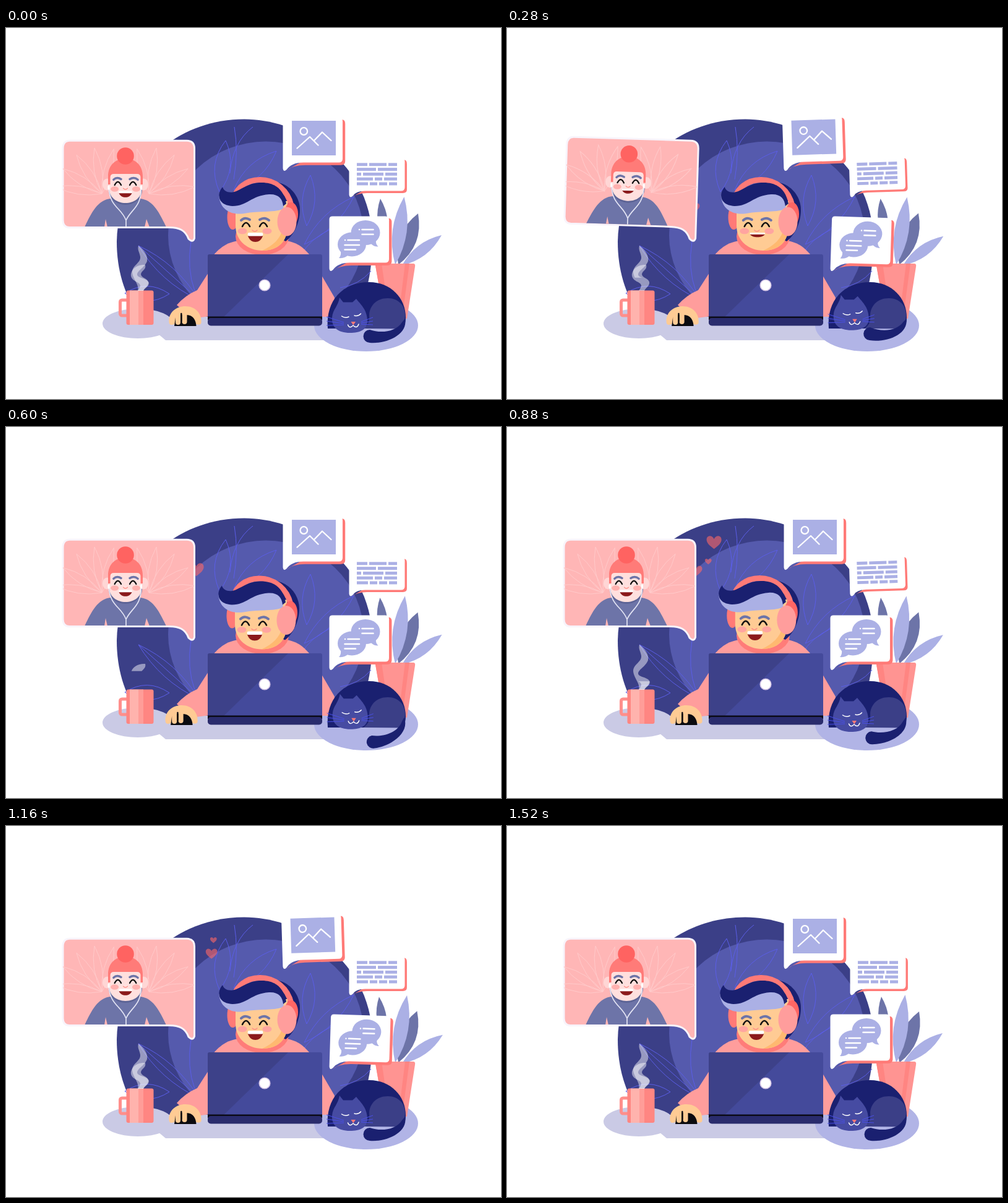
These frames come from a looping animation (800 by 600 pixels, 1.56 s). An HTML page:

```html
<!DOCTYPE html>
<html lang="en">
<head>
<meta charset="utf-8">
<title>Video call</title>
<style>
html, body { margin: 0; width: 100%; height: 100%; overflow: hidden; background: #fff; }
svg { display: block; width: 100vw; height: 100vh; }
.line { fill: none; stroke-linecap: round; stroke-linejoin: round; }
</style>
</head>
<body>
<svg viewBox="0 0 800 600">
<defs>
  <path id="heart" d="M0 10C-8 4-12 0-12-5C-12-12-3-13 0-6C3-13 12-12 12-5C12 0 8 4 0 10Z" fill="#ff6765"/>
  <g id="features">
    <ellipse cx="-20" cy="7.500" rx="7.500" ry="4.800"/>
    <ellipse cx="20" cy="7.500" rx="7.500" ry="4.800"/>
    <g class="line">
      <path d="M-22-10Q-16-16-8-11M8-11Q16-16 23-10" stroke="#6d74a8" stroke-width="4"/>
      <path d="M-20 0Q-14-12-8 0M8 0Q14-12 20 0" stroke="#111" stroke-width="2.600"/>
      <path d="M-4 6Q0 10 4 6" stroke="#ff9088" stroke-width="1.500"/>
    </g>
  </g>
  <g id="mouth">
    <path d="M-12 5H12C10 12 5 15 0 15C-5 15-10 12-12 5Z" fill="#8b1a1c"/>
    <rect x="-12.300" width="24.600" height="5.600" rx="2" fill="#fff"/>
  </g>
  <clipPath id="screen"><path d="M92 183H304V321H92Z"/></clipPath>
  <clipPath id="wall"><path d="M150 140H620V467H150Z"/></clipPath>
  <clipPath id="clipA"><rect id="cutA" x="190" width="60"/></clipPath>
  <clipPath id="clipB"><rect id="cutB" x="190" width="60"/></clipPath>
</defs>

<g clip-path="url(#wall)">
  <path d="M216 467C190 430 179 390 179 345C181 235 270 147.500 385 147.500C480 147.500 592 220 592 345C592 400 580 440 565 467Z" fill="#3b3f87"/>
  <ellipse cx="420" cy="335" rx="158" ry="151.500" fill="#555aad"/>
  <g id="veins" fill="none" stroke="#5b5ee8">
    <path d="M369 160Q376 200 368 245M399 160Q366 185 362 235M214 352L318 445M299 345Q292 390 305 425M525 325Q490 342 478 366M590 393Q570 416 540 420"/>
  </g>
</g>

<g id="desk">
  <ellipse cx="213" cy="478" rx="57" ry="24" fill="#cacae5"/>
  <path d="M225 467H560L530 505H258L246 495Z" fill="#cacae5"/>
  <ellipse cx="582" cy="481" rx="84" ry="42" fill="#b1b4e6"/>
</g>

<g id="plant"></g>
<path d="M597 384Q597 381 600 381H658Q662 381 661 386L648 470H612Z" fill="#ff9492"/>
<path d="M597 384Q597 381 600 381H607L620 470H612ZM645 381H652L640 470H634Z" fill="#ff8582"/>

<g id="man">
  <path d="M327 396L309 424Q290 432 276 448L300 470L330 466ZM510 400L531 436L527 467H510Z" fill="#ff9d9c"/>
  <path d="M326 400V380C338 362 352 347 376 344H452C472 347 480 355 490 366L511 400Z" fill="#ff9d9c"/>
  <ellipse cx="414" cy="337" rx="43" ry="30" fill="#ff7c79"/>
  <g id="skull">
    <path d="M400 255C445 235 475 265 475 294C475 315 465 335 452 345L400 320Z" fill="#1a2070"/>
    <path d="M366 285C372 232 448 232 461 287" class="line" stroke="#ff7a77" stroke-width="9"/>
    <ellipse cx="366.500" cy="306" rx="9" ry="20" fill="#ff7a77"/>
    <path d="M371 285V320C371 345 392 360 414 360C440 360 455 345 455 320V280H385Z" fill="#ffcb94"/>
    <path d="M455 320C455 345 440 360 414 360C432 352 444 340 447 325Z" fill="#ffb970"/>
  </g>
  <g id="face">
    <path d="M344 271C346 293 362 303 385 300C410 295 430 299 448 293C453 274 440 266 425 267C400 269 385 289 365 287Z" fill="#abb0e5"/>
    <path d="M350 257C340 268 342 287 366 288C390 288 396 271 425 269C440 268 447 276 448 288L453 284C449 262 436 250 413 250C395 250 385 258 372 264C362 268 352 265 350 257Z" fill="#1a2070"/>
    <use href="#features" x="402" y="321" fill="#ffa5a0"/>
    <use href="#mouth" id="grin"/>
  </g>
  <g id="cups">
    <ellipse cx="461" cy="301" rx="11" ry="19" fill="#ff6664"/>
    <ellipse cx="454" cy="313" rx="15.500" ry="23.500" fill="#ff9d9c"/>
  </g>
</g>

<g id="laptop">
  <rect x="326" y="366" width="185" height="103" rx="3" fill="#444a9b"/>
  <path d="M329 366H456L352 467H326V369Q326 366 329 366Z" fill="#3d4189"/>
  <path d="M326 466.500H511V472H326Z" fill="#0b0b18"/>
  <rect x="326" y="469" width="185" height="12.500" rx="5" fill="#2a2c6d"/>
  <circle cx="418" cy="416" r="8.800" fill="#fff" stroke="#d3c3e6" stroke-width="1.600"/>
</g>

<g id="hand">
  <path d="M263.500 476C262 460 275 450 290 450C305 450 317 461 315.500 477Q314 481 307 479H272Q264 482 263.500 476Z" fill="#ffcb94"/>
  <path d="M272 482L274 468Q278 463 290 464C302 463 307 472 307.500 482Z" fill="#0b0b10"/>
  <path d="M278 460V476M288.500 460V475" class="line" stroke="#ffcb94" stroke-width="8"/>
  <path d="M283.300 462V474" class="line" stroke="#0b0b10" stroke-width="2.400"/>
</g>

<g id="mug">
  <rect x="184.500" y="440" width="20" height="25" rx="3" fill="none" stroke="#ff8f8c" stroke-width="5"/>
  <rect x="194.500" y="424.500" width="44" height="55.500" rx="3" fill="#ff8682"/>
  <path d="M200 424.500H214V480H200Z" fill="#ffb3ad"/>
  <path d="M214 424.500H222V480H214Z" fill="#ff9d98"/>
</g>
<g fill="#fff" fill-opacity=".47">
  <g clip-path="url(#clipA)"><path d="M214 352C222 358 230 368 228 377C224 388 212 392 212 399C213 405 228 404 231 412C231 419 224 420 222 425H213C216 415 204 405 204 394C205 383 218 380 217 370C216 363 212 359 214 352Z"/></g>
  <g clip-path="url(#clipB)"><path d="M225 383C211 382 201 391 202 401C204 411 217 410 217 417Q216 421 213 425H222C224 420 231 417 230 411C229 405 218 404 218 398C219 392 227 391 225 383Z"/></g>
</g>

<g id="cat">
  <path d="M520 486C516 440 545 411 587 411C622 411 646 437 646 468C646 480 642 486 630 486Z" fill="#1a2070"/>
  <path d="M578 486C585 480 588 476 587 464C588 448 600 437 617 437C635 437 646 450 645 466L642 486.500Z" fill="#3b3f87"/>
  <path id="tail" d="M645 470C650 496 615 511 588 509A10.500 10.500 0 0 1 588 488C605 494 630 492 640 476Z" fill="#1a2070"/>
  <g id="catHead">
    <path d="M539 436L545 443.500H560L566 438C572 446 584 455 584 474C584 488 572 493 556 493C536 493 526 484 527 468C528 455 537 450 539 436Z" fill="#464ba2"/>
    <g id="whiskers" stroke="#4a50e6"></g>
    <path d="M542.500 466Q548 470 554 467M563 465Q569 467 573.500 462M552.500 480Q555 487 561 481Q567 487 570 479" class="line" stroke="#fff" stroke-width="1.400"/>
    <path d="M557.500 475H565L561.300 480.500Z" fill="#ff7a77"/>
  </g>
</g>

<g id="hearts"></g>

<g id="call">
  <path d="M103 182.300H292Q304.500 182.300 304.500 195V340Q302 348 295 341C290 327 280 322.500 264 322.500H102Q92 322 92 311V195Q92 182.300 103 182.300Z" fill="#ffb6b6" stroke="#f8f4fb" stroke-width="3"/>
  <g clip-path="url(#screen)">
    <g id="fronds" fill="none" stroke="#ffcaca"></g>
    <path d="M127 322C138 299 148 278 169 276H217C238 278 248 299 259 322Z" fill="#6d74a8"/>
    <path d="M159 322L161 309L164 322ZM224 322L227 309L232 322Z" fill="#ffb6b6"/>
    <ellipse cx="193" cy="263" rx="27" ry="23" fill="#5d6496"/>
    <ellipse cx="163.500" cy="253" rx="7.500" ry="9.500" fill="#ffd6d5"/>
    <ellipse cx="222.500" cy="253" rx="7.500" ry="9.500" fill="#ffd6d5"/>
    <path d="M167 232V262C168 275 180 283 193 283C207 283 218 275 219 262V232Z" fill="#ffe0de"/>
    <path d="M165 253V240C165 221 178 211 193 211C208 211 221 221 221 240V253H217.500V241Q217 236 212 236H174Q169 236 168.500 241V253Z" fill="#ff7b78"/>
    <circle cx="193" cy="207" r="13.800" fill="#ff6361"/>
    <path d="M166 258C168 290 186 290 194 311V322M218.500 258C219 290 202 293 194 311" class="line" stroke="#e3e4f4" stroke-width="1.700"/>
    <path d="M166 256V260M218.500 256V260" class="line" stroke="#fff" stroke-width="3"/>
    <use href="#features" transform="translate(193 254) scale(.87)" fill="#ffb0ae"/>
    <use href="#mouth" id="smile"/>
  </g>
</g>

<g id="photo">
  <path d="M462 150H533V206H462Z" fill="#abb0e5"/>
  <g class="line" stroke="#fff" stroke-width="2.300">
    <circle cx="481.300" cy="167" r="5.800"/>
    <path d="M470.500 194.500L491 176L504.500 189.500M497.500 182.500L511 168.500L525.500 182"/>
  </g>
</g>
<g id="note"></g>
<g id="chat">
  <g fill="#abb0e5">
    <path d="M590 349Q595 354 601.500 353.500Q597 349 598 343Z"/>
    <ellipse cx="581" cy="331" rx="23.500" ry="20"/>
    <path d="M541 361Q542 368 538 372Q548 373 553 367Z"/>
    <ellipse cx="559" cy="350" rx="23" ry="19.500"/>
  </g>
  <path d="M575.500 326H593.500M575.500 333.700H593.500M571 326V326.100M552.500 343H571M547.500 351H571M547.500 358.500H565M548 343V343.100" class="line" stroke="#fff" stroke-width="2.500"/>
</g>
</svg>
<script>
const NS = 'http://www.w3.org/2000/svg', LOOP = 1560, STEP = 40;
const $ = id => document.getElementById(id);
function add(id, tag, attrs) {
  const n = document.createElementNS(NS, tag);
  for (const k in attrs) n.setAttribute(k, attrs[k]);
  return $(id).appendChild(n);
}

// pointed leaf from base (x, y) to tip (u, v)
function leaf(id, x, y, u, v, wide, attrs) {
  const k = wide / Math.hypot(u - x, v - y), nx = (v - y) * k, ny = (x - u) * k;
  const mx = (x + u) / 2, my = (y + v) / 2;
  return add(id, 'path', { d: `M${x} ${y}Q${mx + nx} ${my + ny} ${u} ${v}Q${mx - nx} ${my - ny} ${x} ${y}Z`, ...attrs });
}
leaf('veins', 345, 265, 355, 182, 25);
leaf('veins', 368, 262, 437, 199, 22);
leaf('veins', 486, 320, 492, 238, 20);
leaf('veins', 482, 350, 562, 273, 20);
leaf('veins', 312, 440, 214, 352, 20);
leaf('veins', 192, 429, 264, 430, 24);
for (let i = 0; i < 5; i++) {
  const a = .15 + i * .42;
  for (const side of [-1, 1]) {
    const x = 193 + side * 38, y = 268;
    leaf('fronds', x, y, x + side * 75 * Math.cos(a), y - 75 * Math.sin(a), 13);
  }
}
const plant = [
  leaf('plant', 612, 345, 605, 276, 16, { fill: '#6d74a8' }),
  leaf('plant', 634, 383, 666, 300, 27, { fill: '#6d74a8' }),
  leaf('plant', 629, 383, 643.5, 273, 23, { fill: '#abb0e5' }),
  leaf('plant', 640, 384, 704, 335, 18, { fill: '#abb0e5' })
];
for (let i = -1; i < 2; i++)
  add('whiskers', 'path', { d: `M546 ${478 + 2 * i}L518 ${474 + 7 * i}M574 ${477 + 2 * i}L593 ${474 + 6 * i}` });

// speech bubble: left, top, right, bottom, tail end, tail width, depth
function bubble(id, l, t, r, b, e, w, k) {
  const R = r + k, B = b + k;
  const shade = `M${r - 4} ${t + 4}Q${R} ${t + 1} ${R} ${t + 10}V${b - 2}Q${R} ${B} ${r - 3} ${B}` +
    `H${l + w + 3}Q${l + w / 2} ${B} ${l + 5} ${e - 1}L${l + w} ${b - 3}H${r - 4}Z`;
  const face = `M${l} ${t + 5}Q${l} ${t} ${l + 5} ${t}H${r - 6}Q${r} ${t} ${r} ${t + 6}V${b - 6}Q${r} ${b} ${r - 6} ${b}` +
    `H${l + w}Q${l + w * .43} ${b} ${l + 6} ${e - 3}Q${l + 1} ${e + 2} ${l} ${e - 5}Z`;
  $(id).prepend(add(id, 'path', { d: shade, fill: '#ff7a77' }), add(id, 'path', { d: face, fill: '#fff' }));
}
bubble('photo', 447.5, 145, 544, 217.5, 232, 33, 4.2);
bubble('note', 554.5, 210, 644.5, 263.5, 274.5, 26, 3.4);
bubble('chat', 522.5, 304.5, 619, 379.5, 394, 33, 4.4);

// where the words end in each row
[[584, 615], [598], [574, 610], [593, 608], [585, 600, 616]].forEach((ends, i) => {
  let x = 567;
  for (const end of [...ends, 632]) {
    add('note', 'rect', { x, y: 218.3 + i * 7.8, width: end - x, height: 4.9, fill: '#abb0e5' });
    x = end + 3;
  }
});

const clamp = u => Math.min(1, Math.max(0, u));
const ramp = (t, a, b) => (1 - Math.cos(Math.PI * clamp((t - a) / (b - a)))) / 2;
const hump = (t, a, b, peak = (a + b) / 2) => ramp(t, a, peak) - ramp(t, peak, b);
const put = (node, v) => node.setAttribute('transform', v);
const turn = (id, deg, x, y) => put($(id), `rotate(${deg} ${x} ${y})`);
const move = (id, x, y) => put($(id), `translate(${x} ${y})`);

// steam leaves upwards from time out, then grows again from time back
function steam(id, t, top, out, back, span) {
  const gone = ramp(t, out, out + span), h = 426 - top;
  const grown = ramp(t, back, back + span);
  $(id).setAttribute('y', t < back ? top : 426 - h * grown);
  $(id).setAttribute('height', h * (t < back ? 1 - gone : grown));
}

const hearts = [
  { born: 0, x: 305, y: 302, dx: -4, dy: -22, size: .7 },
  { born: 480, x: 296, y: 250, dx: 54, dy: -88, size: 1 },
  { born: 760, x: 321, y: 232, dx: 20, dy: -66, size: .45 },
  { born: 760, x: 295, y: 244, dx: 52, dy: -52, size: .78 }
];
for (const h of hearts) h.node = add('hearts', 'use', { href: '#heart' });

function draw(t) {
  const first = hump(t, 0, 580), late = first + hump(t, 890, 1490);
  turn('call', 1.8 * first, 300, 344);
  turn('photo', -1.8 * late, 450, 231);
  turn('chat', 1.8 * late, 525, 392);
  turn('note', -1.8 * (first + hump(t, 600, 1160)), 557, 273);

  const fore = 2 * hump(t, 0, 460), back = -2.5 * hump(t, 440, 1160);
  move('skull', back, back / 2);
  move('cups', back, back / 2);
  move('face', fore + back, back / 2);
  const shut = Math.sqrt(Math.max(0, hump(t, 0, 600)));
  put($('grin'), `translate(403 331) scale(1 ${1 - .52 * shut})`);
  put($('smile'), `translate(193 263.5) scale(${.87 - .1 * shut} ${.68 - .18 * shut})`);

  const reach = hump(t, 0, 880);
  move('hand', -8.3 * reach, 0);
  move('catHead', reach, -6 * reach);
  turn('tail', 4 * hump(t, 0, 560) - 13 * hump(t, 440, 1040, 640), 643, 478);

  const sway = hump(t, 0, 800, 340) + 1.4 * hump(t, 640, 1520, 1160);
  plant.forEach((p, i) => put(p, `rotate(${(i < 2 ? -.8 : 1.7) * sway} ${612 + 9 * i} 383)`));

  steam('cutA', t, 350, 200, 640, 220);
  steam('cutB', t, 380, 440, 780, 260);

  for (const h of hearts) {
    const u = clamp((t - h.born) / 560);
    put(h.node, `translate(${h.x + h.dx * u} ${h.y + h.dy * u}) scale(${h.size})`);
    h.node.setAttribute('opacity', .6 * Math.min(1, 6 * u, 6 - 6 * u));
  }
}

const start = performance.now();
function tick() {
  const t = (performance.now() - start) % LOOP;
  draw(Math.floor(t / STEP) * STEP);
  requestAnimationFrame(tick);
}
draw(0);
requestAnimationFrame(tick);
</script>
</body>
</html>
```
